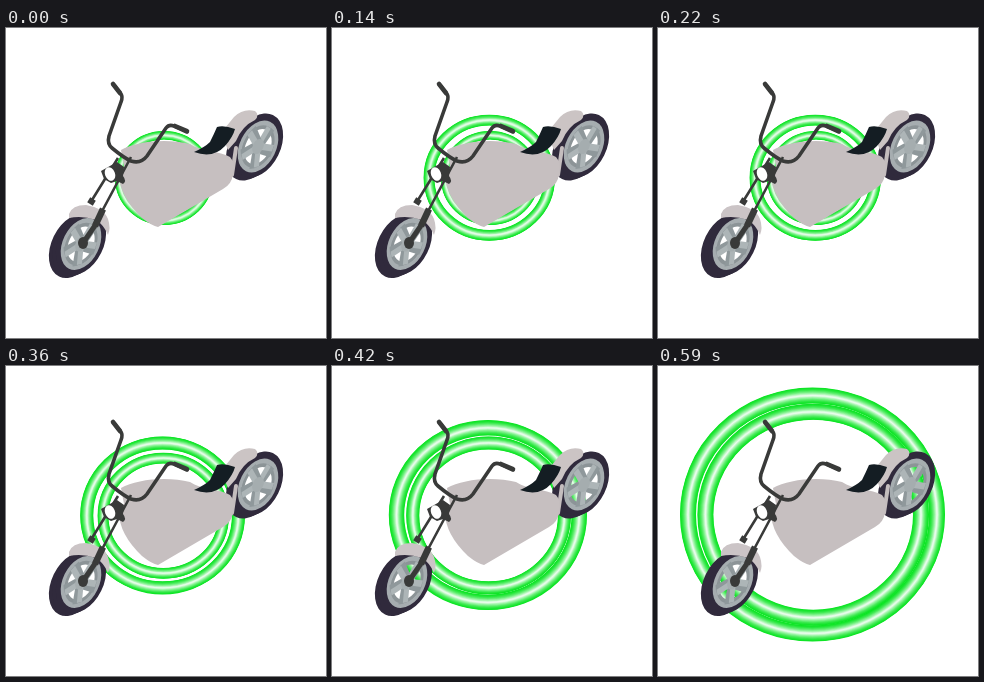
Recreate the animation shown at these times as an HTML page with a canvas. Size 320 by 310 pixels, loop 0.69 s.

```html
<!DOCTYPE html>
<html lang="en">
<head>
<meta charset="utf-8">
<title>Motorcycle with pulsing rings</title>
<style>
  html, body { margin: 0; width: 100%; height: 100%; overflow: hidden; background: #fff; }
  canvas, svg { position: absolute; left: 0; top: 0; width: 320px; height: 310px; }
  .dark { fill: none; stroke: #393a39; stroke-linejoin: round; }
  .round { stroke-linecap: round; }
</style>
</head>
<body>
<canvas id="rings" width="320" height="310"></canvas>
<svg viewBox="0 0 320 310">
  <defs>
    <ellipse id="tire" rx="22.5" ry="34" transform="rotate(26)"/>
    <mask id="hole" maskUnits="userSpaceOnUse" x="-50" y="-50" width="100" height="100">
      <rect x="-50" y="-50" width="100" height="100" fill="#fff"/>
      <use href="#tire" y="1" transform="scale(.74)" fill="#000"/>
    </mask>
    <g id="wheel">
      <g mask="url(#hole)" fill="#302a3c">
        <use href="#tire" x="-7" y="3"/>
        <use href="#tire" x="-3.5" y="1.5"/>
        <use href="#tire"/>
      </g>
      <g transform="translate(0 1) rotate(26) scale(.66 1)" fill="none">
        <circle r="21" stroke="#8c9497" stroke-width="5"/>
        <circle r="25" stroke="#a6adb0" stroke-width="5"/>
        <g id="spokes" stroke-width="7"></g>
        <circle r="8" fill="#a5adaf"/>
      </g>
    </g>
  </defs>

  <use href="#wheel" x="252" y="117.5"/>
  <path d="M215 105L228 89Q237 80 249 83Q254 87 249 92Q236 98 230 113L222 122Z" fill="#cbc4c4"/>
  <path d="M230 120L226 147" stroke="#c4bdbe" stroke-width="4" class="round"/>
  <path d="M115 122C130 113 162 110 184 116C195 124 214 123 224 129Q229 134 227 146Q226 156 217 161L152 199Q146 198 136 190Q113 168 113 146L118 138Z" fill="#c6bfc0"/>
  <path d="M188 124Q199 119 204 114Q208 106 211 99Q218 97 229 101Q227 109 219 118Q207 131 188 124Z" fill="#141d23"/>

  <use href="#wheel" x="75" y="215"/>
  <path d="M63 186Q66 177 80 177Q98 180 102 191Q105 200 102 207Q98 197 90 192Q76 187 63 190Z" fill="#cbc4c6"/>

  <g class="dark">
    <path d="M112 130L86 172M125 129L94 187" stroke-width="2.6"/>
    <path d="M87 171L84 176M97 181L89 198" stroke-width="6.5"/>
    <path d="M90 196L77 215" stroke-width="5"/>
    <path d="M107 56L115 66Q117 69 115 74L103 108Q101 116 106 120Q118 130 125 133Q135 136 141 128L160 100Q163 96 168 98L181 104" stroke-width="3.6" class="round"/>
    <path d="M107 56L114 65M169 98L181 103" stroke-width="4.6" class="round"/>
  </g>
  <ellipse cx="77" cy="215" rx="5" ry="6" fill="#393a39"/>
  <path d="M95 143L111 134L118 139L117 148Q121 153 117 156L111 153L105 155L98 151Z" fill="#393a39"/>
  <ellipse cx="104" cy="146" rx="5" ry="7" transform="rotate(-22 104 146)" fill="#fff"/>
</svg>
<script>
const ctx = document.getElementById("rings").getContext("2d");
const holds = [140, 140, 140, 90, 80, 100];
const loop = holds.reduce((a, b) => a + b);

document.getElementById("spokes").innerHTML = [0, 1, 2, 3, 4].map(i =>
  `<g transform="rotate(${i * 72})"><path d="M4 -3L8 -22" stroke="#8f989b"/><path d="M0 -4L2 -22" stroke="#adb5b7"/></g>`
).join("");

// Rings grow and thicken evenly with k; thinning strokes shade green edges to a white middle.
function drawRing(k) {
  const width = Math.min(16, 8.5 + 2.3 * k);
  const rx = 49 + 16.7 * k - width / 2;
  const ry = 47 + 16 * k - width / 2;
  ctx.beginPath();
  ctx.ellipse(158 - 0.7 * k, 150 - 0.3 * k, rx, ry, 0, 0, 2 * Math.PI);
  for (let s = 0; s < 1; s += 0.05) {
    const light = s ** 1.5;
    ctx.strokeStyle = `rgb(${[12, 228, 36].map(c => c + (255 - c) * light)})`;
    ctx.lineWidth = width * (1 - s);
    ctx.stroke();
  }
}

function stepAt(ms) {
  let k = 0;
  while (ms >= holds[k]) ms -= holds[k++];
  return k;
}

// Each step shows the newest ring and the one before it.
function draw() {
  const k = stepAt((performance.now() - start) % loop);
  ctx.clearRect(0, 0, 320, 310);
  drawRing(k);
  if (k > 0) drawRing(k - 1);
  requestAnimationFrame(draw);
}
const start = performance.now();
draw();
</script>
</body>
</html>
```
